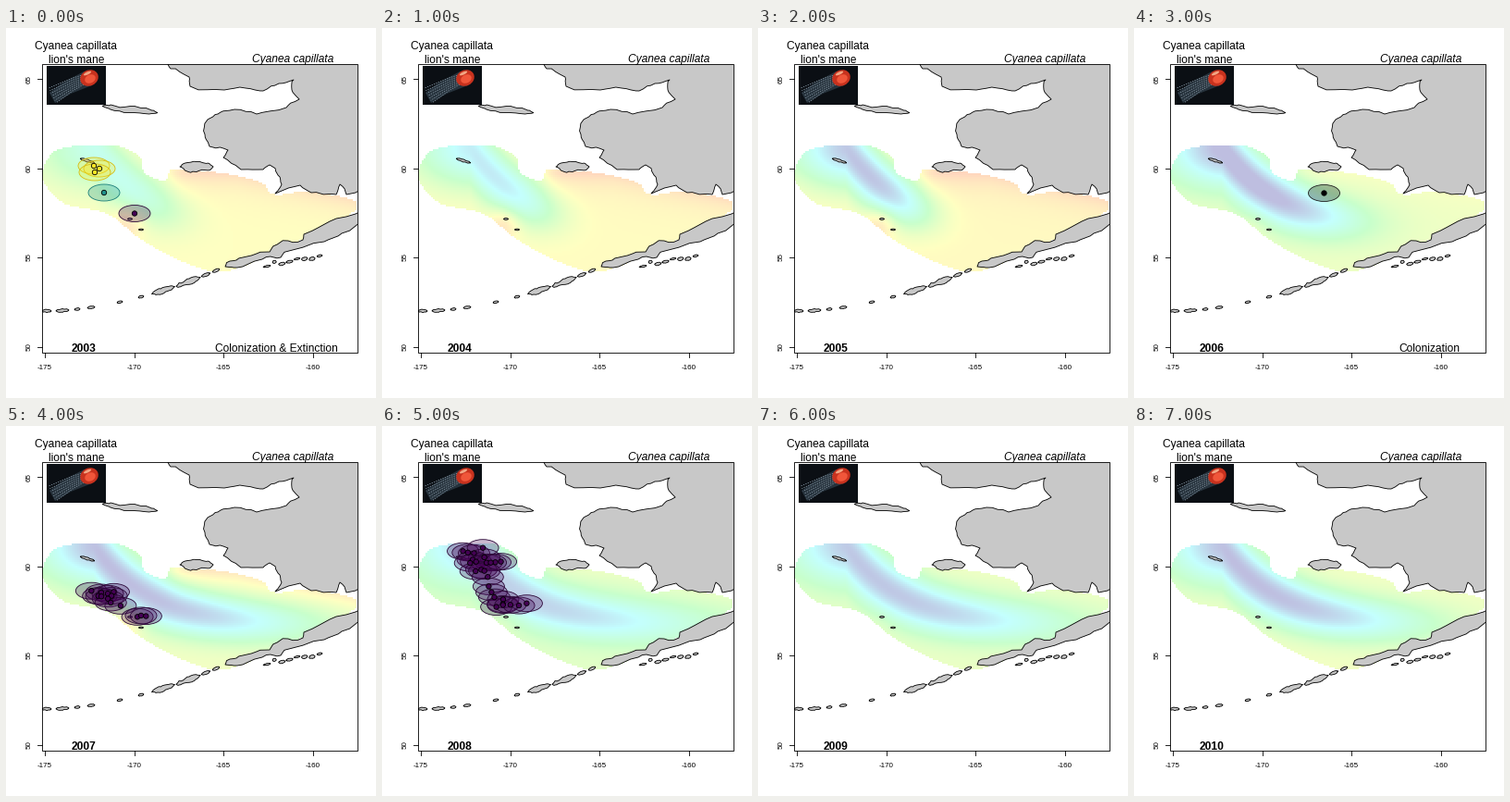
These frames come from a looping animation (400x400 px, 8 s). A matplotlib script:

```python
import numpy as np
import matplotlib.pyplot as plt
from matplotlib.animation import FuncAnimation
from matplotlib.patches import Ellipse, Polygon, Rectangle
from matplotlib.path import Path

SIZE, DPI = 400, 100
PX = 72 / DPI                       # one pixel in points
THIN = 0.85 * PX
LEFT, RIGHT, TOP, BOTTOM = 39, 380, 39, 351
YEARS = range(2003, 2011)
rng = np.random.default_rng(7)

plt.rcParams["font.family"] = "Liberation Sans"
fig = plt.figure(figsize=(SIZE / DPI, SIZE / DPI), dpi=DPI, facecolor="white")
ax = fig.add_axes([0, 0, 1, 1])
ax.axis("off")


def label(x, y, text, size=12, **style):
    return ax.text(x, y, text, fontsize=size * PX, ha="center",
                   color="black", zorder=8, **style)


def line(xs, ys, color="black", z=6, **style):
    ax.plot(xs, ys, color=color, lw=THIN, zorder=z, **style)


def box(x0, y0, x1, y1, **style):
    return ax.add_patch(Rectangle((x0, y0), x1 - x0, y1 - y0, **style))


# --- land ---------------------------------------------------------------
frame = box(LEFT, TOP, RIGHT, BOTTOM, fill=False, ec="black", lw=THIN, zorder=6)


def rough(points, rounds=2):
    """Break up an outline with seeded wiggles in proportion to its sides."""
    pts = np.array(points, float)
    for _ in range(rounds):
        after = np.roll(pts, -1, axis=0)
        length = np.hypot(*(after - pts).T)
        amp = np.minimum(0.08 * length, 1.3)[:, None]
        mids = (pts + after) / 2 + amp * rng.normal(size=pts.shape)
        pts = np.stack([pts, mids], axis=1).reshape(-1, 2)
    return pts


def land(points):
    patch = ax.add_patch(Polygon(rough(points), fc="#c8c8c8", ec="black",
                                 lw=THIN, joinstyle="round", zorder=3))
    patch.set_clip_path(frame)


def island(x, y, w, h, tilt=0):
    t = np.linspace(0, 2 * np.pi, 9)[:-1]
    u, v = w * np.cos(t), h * np.sin(t)
    c, s = np.cos(tilt), np.sin(tilt)
    land(np.c_[x + c * u - s * v, y + s * u + c * v])


# mainland, clockwise from the north-west
land([(173, 36), (178, 44), (198, 53), (199, 63), (236, 67), (259, 65),
      (278, 68), (295, 60), (311, 56), (309, 67), (317, 77), (303, 86),
      (271, 93), (247, 88), (229, 93), (218, 99), (215, 115), (220, 128),
      (240, 132), (235, 140), (254, 153), (278, 153), (285, 148), (294, 159),
      (298, 169), (291, 179), (318, 170), (330, 178), (357, 180), (361, 169),
      (368, 180), (400, 170), (440, -60)])
# peninsula
land([(400, 192), (357, 206), (322, 223), (321, 229), (305, 230), (285, 242),
      (256, 248), (242, 252), (237, 258), (250, 259), (277, 250), (297, 248),
      (302, 242), (344, 231), (363, 222), (400, 204)])
island(134, 88, 30, 3.5, 0.12)
island(206, 150, 18, 5.5)
island(88, 143.5, 8, 1.5, 0.3)
island(134, 206.5, 2.5, 1)
island(146, 218, 2.5, 0.8)

# the western chain lies on one rising arc
for x, half in [(44, 5), (61, 7), (77, 3), (92, 4), (123, 3), (146, 3),
                (170, 13), (197, 14), (216, 5), (227, 4)]:
    rise = (x - 44) / 174
    island(x, 306 - 40 * rise ** 1.8, half, 0.7 + 0.18 * half,
           -np.arctan(0.41 * rise ** 0.8))
# scattered islets south of the peninsula
for x in np.linspace(282, 339, 8):
    island(x, 258 - 0.22 * (x - 282) + rng.normal(0, 1.5),
           rng.uniform(2, 4), rng.uniform(1, 2), -0.2)


# --- temperature field --------------------------------------------------
def smooth(points, steps=8):
    """Closed Catmull-Rom curve through the points."""
    p = np.array(points, float)
    a, b, c, d = (np.roll(p, k, axis=0)[:, None] for k in (1, 0, -1, -2))
    t = np.linspace(0, 1, steps, endpoint=False)[None, :, None]
    curve = (2 * b + (c - a) * t + (2 * a - 5 * b + 4 * c - d) * t ** 2
             + (3 * b - a - 3 * c + d) * t ** 3) / 2
    return curve.reshape(-1, 2)


SHELF = smooth([
    (40, 154), (52, 134), (80, 127), (122, 128), (145, 140), (150, 157),
    (171, 165), (178, 154), (196, 153), (240, 158), (276, 167), (290, 180),
    (330, 177), (378, 188), (365, 206), (300, 238), (237, 263), (190, 252),
    (145, 228), (110, 201), (64, 190), (43, 170)])
PALETTE = np.array([(190, 190, 224), (196, 255, 255), (200, 255, 204),
                    (255, 255, 194), (255, 208, 190)]) / 255
# year: base warmth, chill of the cold tongue, its reach, warmth of shallows
CLIMATE = {2003: (3.0, 1.7, 80, 0.8), 2005: (3.1, 3.0, 75, 0.8),
           2006: (2.7, 2.9, 130, 0.2), 2007: (2.8, 2.8, 215, 0.8),
           2008: (2.5, 2.2, 230, 0.2), 2010: (2.8, 2.8, 200, 0)}

gx, gy = np.meshgrid(np.arange(40, 380, 2), np.arange(122, 270, 2))
inside = Path(SHELF).contains_points(np.c_[gx.ravel(), gy.ravel()])
east = np.maximum(gx - 95, 0)
# the tongue drops from the north-west, then bends eastward
axis_y = 215 - 85 * np.exp(-east / 60)
width = 24 + 18 * np.exp(-east / 60)
west = 0.6 * np.minimum(gx - 105, 0)
tongue = np.exp(-((gy - axis_y) ** 2 + west ** 2) / width ** 2)
shore_y = 157 + 0.2 * np.maximum(gx - 250, 0)
shore = np.exp(-np.abs(gy - shore_y) / 15) / (1 + np.exp((180 - gx) / 5))
shoal = np.exp(-((gx - 132) ** 2 + (gy - 211) ** 2) / 17 ** 2)


def field(year):
    base, chill, reach, shallow = (
        np.interp(year, list(CLIMATE), column)
        for column in zip(*CLIMATE.values()))
    fade = np.exp(-(np.maximum(gx - 110, 0) / reach) ** 3)
    heat = base - chill * tongue * fade + shallow * (shore + shoal)
    rgba = [np.interp(heat, range(5), channel) for channel in PALETTE.T]
    return np.dstack(rgba + [inside.reshape(heat.shape).astype(float)])


fields = [field(year) for year in YEARS]
raster = ax.imshow(fields[0], interpolation="nearest", aspect="auto", zorder=1,
                   extent=(39, 379, 269, 121))
ax.set_xlim(0, SIZE)
ax.set_ylim(SIZE, 0)

# --- sightings ----------------------------------------------------------
YELLOW, TEAL, PURPLE, BLACK = "#fde725", "#21918c", "#440154", "#000000"
EDGE = {YELLOW: "#d8bd10", TEAL: "#1c7f7a", PURPLE: "#2c0838", BLACK: "#202020"}


def trail(path, count, spread=1.5):
    """Stations spread evenly along a path, with seeded scatter."""
    path = np.array(path, float)
    walked = np.r_[0, np.cumsum(np.hypot(*np.diff(path, axis=0).T))]
    at = np.linspace(0, walked[-1], count)
    points = np.c_[np.interp(at, walked, path[:, 0]),
                   np.interp(at, walked, path[:, 1])]
    return points + rng.normal(0, spread, points.shape)


SPOTS = {
    2003: [(YELLOW, [(95, 149), (101, 152), (96, 156)]),
           (TEAL, [(106, 178)]), (PURPLE, [(139, 200.5)])],
    2006: [(BLACK, [(205.5, 178.5)])],
    2007: [(PURPLE, trail([(93, 179), (118, 179), (96, 184), (117, 184),
                           (107, 190), (124, 195)], 10, 0.7)),
           (PURPLE, trail([(142, 206), (152, 205)], 3, 0.7))],
    2008: [(PURPLE, trail([(85, 134), (112, 136), (94, 148), (127, 147),
                           (102, 156), (114, 159), (118, 184), (132, 186),
                           (122, 196), (157, 192)], 26))]}


def sightings(year):
    artists = []
    for color, points in SPOTS.get(year, []):
        for spot in points:
            artists += [
                Ellipse(spot, 34, 18, fc=color, alpha=0.28, zorder=4),
                Ellipse(spot, 34, 18, fill=False, ec=EDGE[color], lw=THIN,
                        zorder=4),
                Ellipse(spot, 5.4, 5.4, fc=color, ec="black", lw=THIN,
                        zorder=5)]
    for artist in artists:
        ax.add_patch(artist)
    return artists


marks = [sightings(year) for year in YEARS]

# --- axes and titles ----------------------------------------------------
for i in range(4):
    x, y = 42 + 96.5 * i, 55 + 96.5 * i
    line([x, x], [BOTTOM, BOTTOM + 5])
    line([LEFT - 5, LEFT], [y, y])
    label(x, 369, str(-175 + 5 * i), 8)
    label(25, y, str(65 - 5 * i), 8, rotation=90, va="center")

label(75.5, 23, "Cyanea capillata")
label(76, 38, "lion's mane")
label(310.5, 37, "Cyanea capillata", style="italic")
year_text = label(84, 350, "", weight="bold")
caption = label(0, 350, "")
CAPTIONS = {2003: (292.5, "Colonization & Extinction"),
            2006: (319, "Colonization")}

# --- jellyfish picture as flat shapes -----------------------------------
box(44, 41, 108, 83, fc="#0b0f14", zorder=7)
ax.add_patch(Polygon([(47, 70), (60, 60), (84, 47), (93, 62), (70, 71),
                      (53, 81)], fc="#26323c", zorder=7))
for k in np.linspace(-1, 1, 7):
    line([86, 72, 50 + 4 * k], [55 + 5 * k, 61 + 7 * k, 73 + 8 * k],
         "#8495a2", 7, ls=(0, (1.5, 1.5)))
for x, y, w, h, color in [(90, 54, 20, 17, "#c8321e"), (91, 55, 12, 9, "#f0563a"),
                          (88, 49, 9, 3, "#f2a583")]:
    ax.add_patch(Ellipse((x, y), w, h, angle=-25, fc=color, zorder=7))


def draw(i):
    year = YEARS[i]
    raster.set_data(fields[i])
    year_text.set_text(str(year))
    x, words = CAPTIONS.get(year, (0, ""))
    caption.set_x(x)
    caption.set_text(words)
    for j, group in enumerate(marks):
        for artist in group:
            artist.set_visible(i == j)
    return []


anim = FuncAnimation(fig, draw, frames=len(YEARS), interval=1000,
                     repeat=True, repeat_delay=0, blit=False)
plt.show()
```
